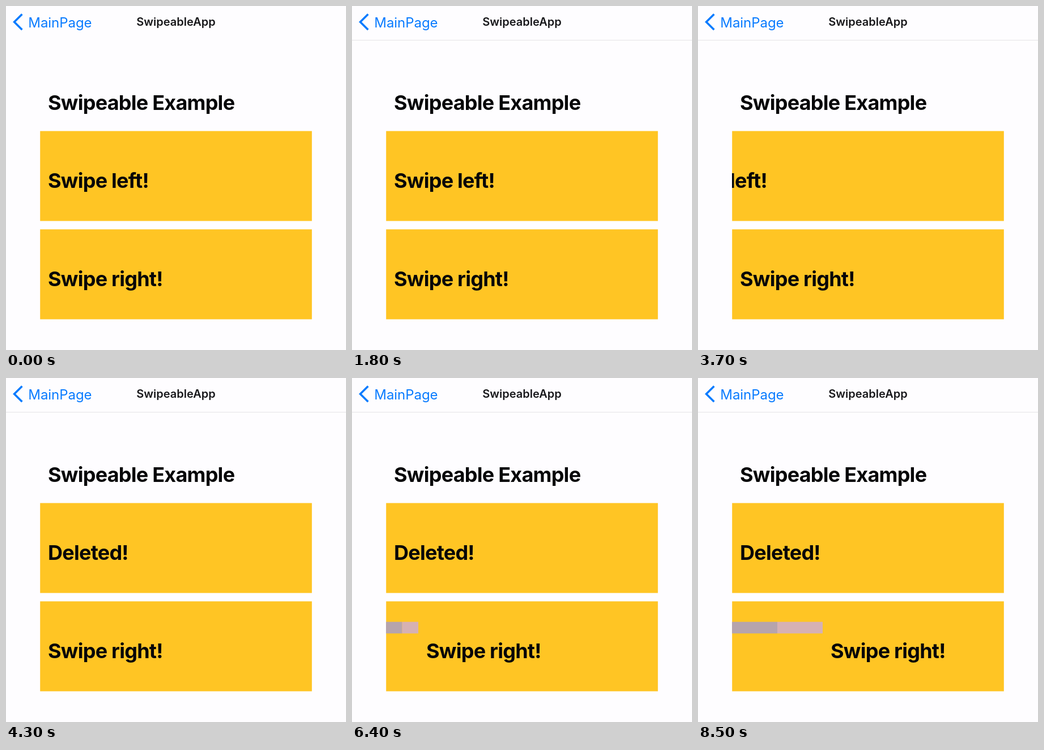
An HTML page that plays this animation: 600x609 px, repeating every 8.6 s.

```html
<!DOCTYPE html>
<html lang="en">
<head>
<meta charset="utf-8">
<title>Swipeable rows</title>
<style>
  html, body { margin: 0; width: 100%; height: 100%; overflow: hidden; background: #fefdff; }
  svg { display: block; width: 600px; height: 609px; }
  text { font-family: Inter, Roboto, sans-serif; font-optical-sizing: none; fill: #060608; }
  .big { font-size: 36px; font-weight: 650; letter-spacing: -0.75px; }
  .nav { font-size: 20px; font-weight: 600; fill: #17171a; }
  .back { font-size: 24px; letter-spacing: -0.05px; fill: #087bff; }
</style>
</head>
<body>
<svg viewBox="0 0 600 609">
  <defs>
    <clipPath id="topClip"><rect x="60" y="221" width="480" height="160"/></clipPath>
    <clipPath id="bottomClip"><rect x="60" y="395" width="480" height="160"/></clipPath>
  </defs>
  <rect width="600" height="609" fill="#fefdff"/>
  <path d="M28.4 14.4 L14.6 28.2 L28.4 42" fill="none" stroke="#087bff" stroke-width="3.6"/>
  <text class="back" x="39.3" y="37.5">MainPage</text>
  <text class="nav" x="300" y="35" text-anchor="middle">SwipeableApp</text>
  <rect id="rule" y="60" width="600" height="1" fill="#e4e3e6"/>
  <text class="big" x="74" y="184">Swipeable Example</text>

  <g clip-path="url(#topClip)">
    <rect x="60.2" y="221.4" width="479.6" height="159.2" fill="#ffc524"/>
    <text class="big" id="topText" x="74" y="322">Swipe left!</text>
  </g>
  <g clip-path="url(#bottomClip)">
    <rect x="60.2" y="395.4" width="479.6" height="159.2" fill="#ffc524"/>
    <rect id="first" x="60" y="431.7" height="20.5" fill="#b6a4ac"/>
    <rect id="second" y="431.7" height="20.5" fill="#d6b1b3"/>
    <text class="big" id="bottomText" x="74" y="496">Swipe right!</text>
  </g>
</svg>
<script>
const LOOP = 8600, STEP = 100, TEXT_X = 74;
const $ = id => document.getElementById(id);
const set = (id, attrs) => {
  for (const key in attrs) $(id).setAttribute(key, attrs[key]);
};

// [time, offset] stops of each drag
const leftDrag = [[3300, 0], [3500, -70], [3800, -160], [4000, -60], [4200, 0]];
const rightDrag = [[6100, 0], [6200, 7], [6300, 29], [6400, 57], [6600, 112], [6800, 148], [7000, 160]];

function along(stops, t) {
  if (t <= stops[0][0]) return stops[0][1];
  for (let i = 1; i < stops.length; i++) {
    const [t0, a] = stops[i - 1], [t1, b] = stops[i];
    if (t <= t1) return a + (b - a) * (t - t0) / (t1 - t0);
  }
  return stops[stops.length - 1][1];
}

function draw(t) {
  const early = t < 1000;
  set("rule", { y: early ? 59 : 60, opacity: t < STEP ? 0 : early ? 0.5 : 1 });

  $("topText").textContent = t < 3900 ? "Swipe left!" : "Deleted!";
  set("topText", { x: TEXT_X + along(leftDrag, t) });

  const shift = along(rightDrag, t), half = shift / 2;
  set("first", { width: half });
  set("second", { x: 60 + half, width: half });
  set("bottomText", { x: TEXT_X + shift });
}

const start = performance.now();
function tick() {
  const t = (performance.now() - start) % LOOP;
  draw(Math.floor(t / STEP) * STEP);
  requestAnimationFrame(tick);
}
draw(0);
requestAnimationFrame(tick);
</script>
</body>
</html>
```
